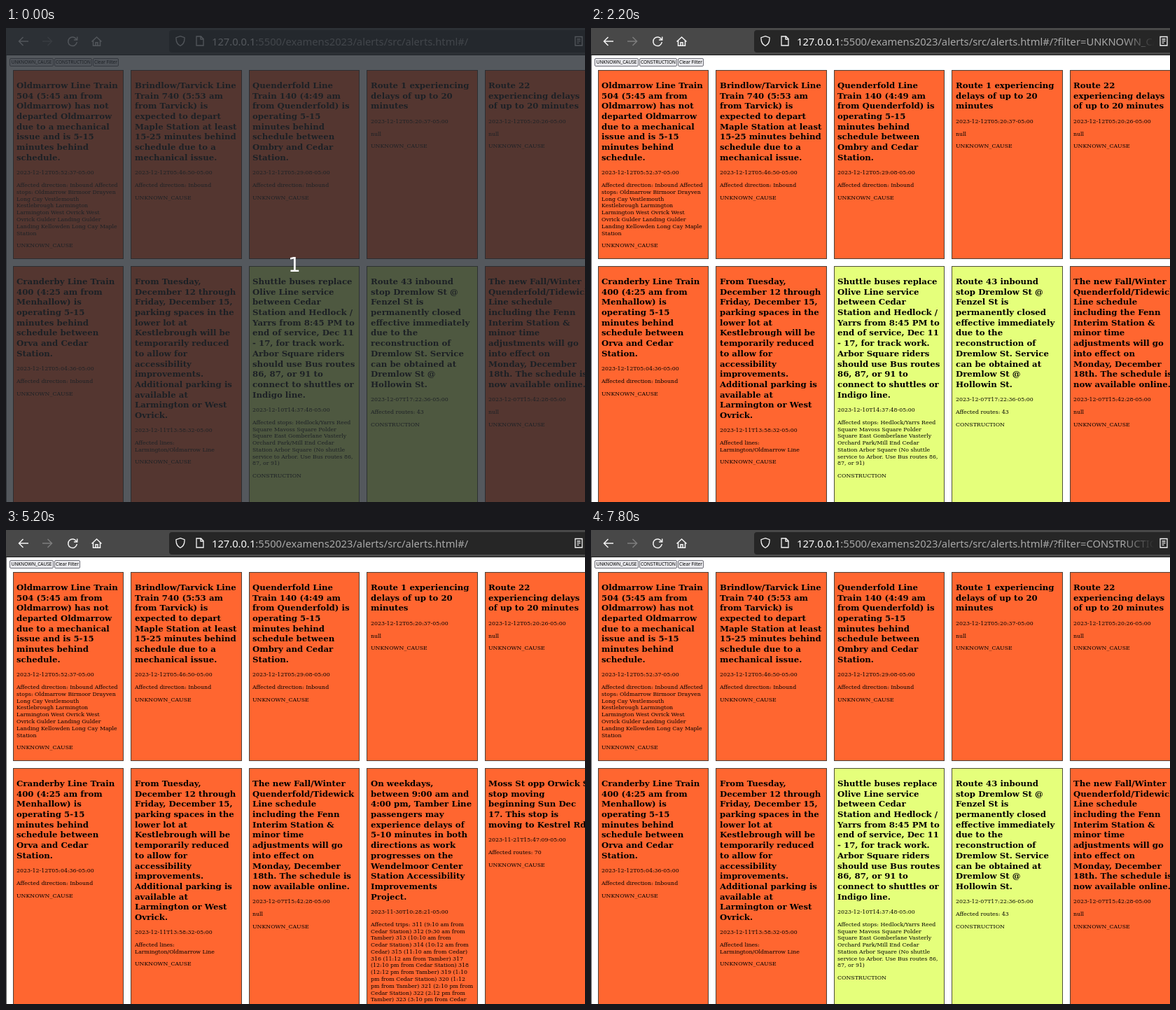
Write an HTML page that moves like this. It is 827 px wide and 677 px high and loops after 8000 ms.

```html
<!DOCTYPE html>
<html lang="en">
<head>
<meta charset="utf-8">
<title>Alerts</title>
<style>
html, body { margin: 0; width: 100%; height: 100%; overflow: hidden; background: #fff; }
#stage { position: relative; width: 827px; height: 677px; overflow: hidden; background: #fff; }
#stage * { box-sizing: border-box; }
#bar { position: absolute; inset: 0 0 auto; height: 39px; background: #484848; border-bottom: 1px solid #1c1c1c; }
#field { position: absolute; left: 233px; top: 3px; width: 620px; height: 32px; border-radius: 4px; background: #262626; }
#bar svg { position: absolute; left: 0; top: 0; fill: none; stroke: #f4f4f4; stroke-width: 1.5; }
#url { position: absolute; left: 294px; top: 7px; width: 511px; height: 25px; overflow: hidden; white-space: pre;
  font: 14.73px/25px "Noto Sans", sans-serif; color: #a9a9a9;
  -webkit-mask: linear-gradient(90deg, #000 465px, transparent 511px); mask: linear-gradient(90deg, #000 465px, transparent 511px); }
#url b { font-weight: 400; color: #fafafa; }
#edge { position: absolute; left: 0; top: 39px; width: 1px; height: 638px; background: #666; }
.btn { position: absolute; top: 43px; height: 12px; border: 1px solid #6f6f78; border-radius: 2px;
  font: 6.5px/10px "Noto Sans", sans-serif; text-align: center; white-space: pre; color: #000; }
.card { position: absolute; width: 158.3px; overflow: visible; background: #ff6630; box-shadow: inset 0 0 0 1px #4c4037; }
.card.work { background: #e5ff7b; box-shadow: inset 0 0 0 1px #4c5037; }
.text { position: absolute; left: 5.4px; top: 5.4px; transform: scale(.4894); transform-origin: 0 0;
  font: 16px/20px "DejaVu Serif", serif; white-space: pre; color: #000; }
.text h2 { margin: 19.92px 0; font: bold 24px/30px "DejaVu Serif", serif; }
.text p { margin: 0 0 16px; }
#shade { position: absolute; inset: 0; background: rgba(36, 42, 48, .78); }
#shade span { position: absolute; left: 0; width: 824px; top: 320px; text-align: center; color: #fff;
  font: 28px/38px "DejaVu Sans", sans-serif; }
</style>
</head>
<body>
<div id="stage">
  <div id="top"></div>
  <div id="all"></div>
  <div id="some"></div>
  <div id="edge"></div>
  <div id="bar">
    <div id="field"></div>
    <svg width="827" height="39">
      <path d="M32 19H18.500M24.500 13L18.500 19L24.500 25"/>
      <path d="M52 19H65.500M59.500 13L65.500 19L59.500 25" stroke="#7d7d7d"/>
      <path d="M100.700 16.500A6.300 6.300 0 1 0 101.300 20M101.700 12.500V17H97"/>
      <path d="M122.500 19.500L129.500 13L136.500 19.500M124.500 18V25.300H134.500V18M128 25V20.800H131V25"/>
      <path d="M249 11.700L255 13.700C255.300 19 253.500 23.300 249 25.500C244.500 23.300 242.700 19 243 13.700Z" stroke-width="1.300"/>
      <path d="M272 12H278.500L282 15.500V25H272ZM278 12V16H282" stroke-width="1.300"/>
      <path d="M813 12.500H823V25H813ZM815.500 16H820.500M815.500 18.700H820.500M815.500 21.400H818.500" stroke-width="1.300"/>
    </svg>
    <div id="url"><b>127.0.0.1</b>:5500/examens2023/alerts/src/alerts.html#/<span id="query"></span></div>
  </div>
  <div id="shade"><span>1</span></div>
</div>
<script>
const $ = id => document.getElementById(id);
const add = (parent, tag, name, text = '') => {
  const el = document.createElement(tag);
  if (name) el.className = name;
  el.textContent = text;
  return parent.appendChild(el);
};

// Each alert: title, time, details, cause; "/ " at a line end is written as a real newline.
const UNKNOWN = 'UNKNOWN_CAUSE', WORK = 'CONSTRUCTION';
const topRow = [
  [`Oldmarrow Line Train
504 (5:45 am from
Oldmarrow) has not
departed Oldmarrow
due to a mechanical
issue and is 5-15
minutes behind
schedule.`, '2023-12-12T05:52:37-05:00', `Affected direction: Inbound Affected
stops: Oldmarrow Birmoor Drayven
Long Cay Vestlemouth
Kestlebrough Larmington
Larmington West Ovrick West
Ovrick Gulder Landing Gulder
Landing Kellowden Long Cay Maple
Station`, UNKNOWN],
  [`Brindlow/Tarvick Line
Train 740 (5:53 am
from Tarvick) is
expected to depart
Maple Station at least
15-25 minutes behind
schedule due to a
mechanical issue.`, '2023-12-12T05:46:50-05:00', 'Affected direction: Inbound', UNKNOWN],
  [`Quenderfold Line
Train 140 (4:49 am
from Quenderfold) is
operating 5-15
minutes behind
schedule between
Ombry and Cedar
Station.`, '2023-12-12T05:29:08-05:00', 'Affected direction: Inbound', UNKNOWN],
  [`Route 1 experiencing
delays of up to 20
minutes`, '2023-12-12T05:20:37-05:00', 'null', UNKNOWN],
  [`Route 22
experiencing delays
of up to 20 minutes`, '2023-12-12T05:20:26-05:00', 'null', UNKNOWN]
];
const late = [`Cranderby Line Train
400 (4:25 am from
Menhallow) is
operating 5-15
minutes behind
schedule between
Orva and Cedar
Station.`, '2023-12-12T05:04:36-05:00', 'Affected direction: Inbound', UNKNOWN];
const parking = [`From Tuesday,
December 12 through
Friday, December 15,
parking spaces in the
lower lot at
Kestlebrough will be
temporarily reduced
to allow for
accessibility
improvements.
Additional parking is
available at
Larmington or West
Ovrick.`, '2023-12-11T13:58:32-05:00', `Affected lines:
Larmington/Oldmarrow Line`, UNKNOWN];
const shuttle = [`Shuttle buses replace
Olive Line service
between Cedar
Station and Hedlock /
Yarrs from 8:45 PM to
end of service, Dec 11
- 17, for track work.
Arbor Square riders
should use Bus routes
86, 87, or 91 to
connect to shuttles or
Indigo line.`, '2023-12-10T14:37:48-05:00', `Affected stops: Hedlock/Yarrs Reed
Square Mavoss Square Polder
Square East Gomberlane Vasterly
Orchard Park/Mill End Cedar
Station Arbor Square (No shuttle
service to Arbor. Use Bus routes 86,
87, or 91)`, WORK];
const closure = [`Route 43 inbound
stop Dremlow St @
Fenzel St is
permanently closed
effective immediately
due to the
reconstruction of
Dremlow St. Service
can be obtained at
Dremlow St @
Hollowin St.`, '2023-12-07T17:22:36-05:00', 'Affected routes: 43', WORK];
const winter = [`The new Fall/Winter
Quenderfold/Tidewick
Line schedule
including the Fenn
Interim Station &
minor time
adjustments will go
into effect on
Monday, December
18th. The schedule is
now available online.`, '2023-12-07T15:42:28-05:00', 'null', UNKNOWN];
const weekdays = [`On weekdays,
between 9:00 am and
4:00 pm, Tamber Line
passengers may
experience delays of
5-10 minutes in both
directions as work
progresses on the
Wendelmoor Center
Station Accessibility
Improvements
Project.`, '2023-11-30T10:28:21-05:00', `Affected trips: 311 (9:10 am from
Cedar Station) 312 (9:30 am from
Tamber) 313 (10:10 am from
Cedar Station) 314 (10:12 am from Tamber)
315 (11:10 am from Cedar Station)
316 (11:12 am from Tamber) 317
(12:10 pm from Cedar Station) 318
(12:12 pm from Tamber) 319 (1:10
pm from Cedar Station) 320 (1:12
pm from Tamber) 321 (2:10 pm from
Cedar Station) 322 (2:12 pm from
Tamber) 323 (3:10 pm from Cedar`.replace('Cedar Station) 314 (10:12 am from Tamber)', 'Cedar Station) 314 (10:12 am from').replace('\n315 (', '\nTamber) 315 (').replace('Tamber) 315 (11:10 am from Cedar Station)', 'Cedar) 315 (11:10 am from Cedar)'), UNKNOWN];
const moved = [`Moss St opp Orwick St
stop moving
beginning Sun Dec
17. This stop is
moving to Kestrel Rd`, '2023-11-21T15:47:09-05:00', 'Affected routes: 70', UNKNOWN];

function drawRow(parent, alerts, y, height) {
  alerts.forEach(([title, time, details, cause], i) => {
    const card = add(parent, 'div', cause === WORK ? 'card work' : 'card');
    card.style.cssText = `left:${9.8 + 168.55 * i}px;top:${y}px;height:${height}px`;
    const text = add(card, 'div', 'text');
    add(text, 'h2', '', title);
    for (const line of [time, details, cause]) add(text, 'p', '', line);
  });
}
drawRow($('top'), topRow, 60, 270);
drawRow($('all'), [late, parking, shuttle, closure, winter], 340, 400);
drawRow($('some'), [late, parking, winter, weekdays, moved], 340, 400);

const makeButton = (label, x, width) => {
  const el = add($('stage'), 'div', 'btn', label);
  el.style.left = x + 'px';
  el.style.width = width + 'px';
  $('stage').insertBefore(el, $('edge'));
  return el;
};
const unknownBtn = makeButton(UNKNOWN, 5, 63);
const workBtn = makeButton(WORK, 69, 54);
const clearBtn = makeButton('Clear Filter', 124, 37);

const between = (t, a, b) => t >= a && t < b;
const paint = (el, hover, press) => el.style.background = press ? '#b1b1b9' : hover ? '#d0d0d7' : '#e9e9ed';
const show = (el, on) => el.style.display = on ? '' : 'none';

function draw(now) {
  const t = now % 8000;
  const filtered = between(t, 3800, 7000);
  show($('shade'), t < 200);
  show($('some'), filtered);
  show($('all'), !filtered);
  show(workBtn, !filtered);
  clearBtn.style.left = (filtered ? 69 : 124) + 'px';
  paint(unknownBtn, between(t, 800, 2200));
  paint(workBtn, between(t, 7400, 7800));
  paint(clearBtn, between(t, 4200, 5200), between(t, 4800, 5000));
  $('query').textContent = between(t, 1800, 5000) ? '?filter=' + UNKNOWN : t >= 7600 ? '?filter=' + WORK : '';
  requestAnimationFrame(draw);
}
requestAnimationFrame(draw);
</script>
</body>
</html>
```
